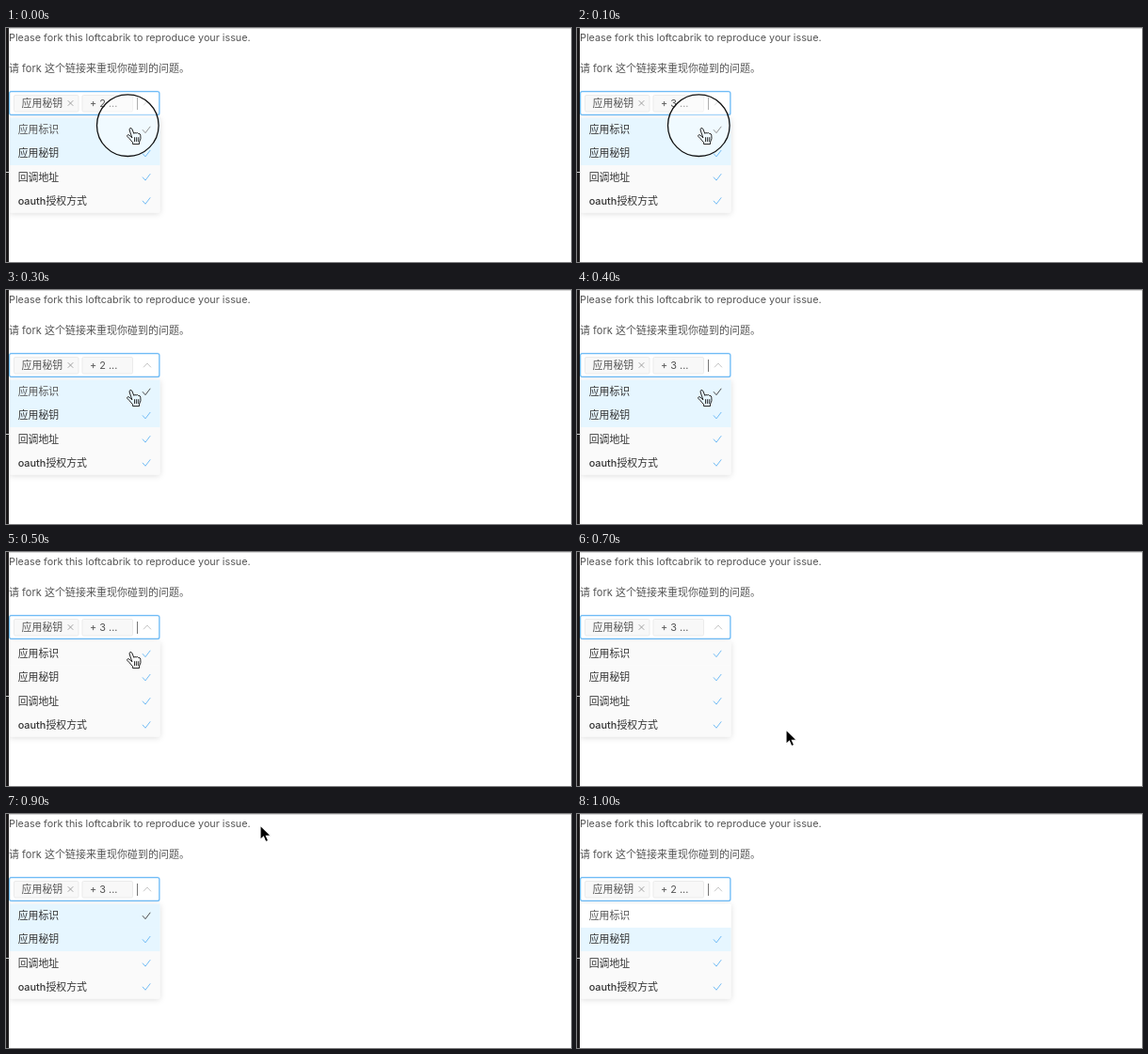
An HTML page that plays this animation: 600x249 px, repeating every 1.1 s.

```html
<!DOCTYPE html>
<html lang="zh-CN">
<head>
<meta charset="utf-8">
<title>Multiple select</title>
<style>
  html, body { margin: 0; width: 100%; height: 100%; overflow: hidden; background: #fff; }
  svg { display: block; width: 600px; height: 249px; }
  text { font: 400 10.9px Inter, "Noto Sans CJK SC", "Noto Sans CJK", sans-serif; fill: #555; }
  .intro { font-size: 10.8px; }
  .bold { font-weight: 500; fill: #333; }
  .line { fill: none; stroke-linecap: round; stroke-linejoin: round; }
  .tag rect { fill: #f8f8f8; stroke: #ebebeb; }
  .menu { filter: drop-shadow(0 1px 3px rgba(0, 0, 0, .14)); }
</style>
</head>
<body>
<svg viewBox="0 0 600 249">
  <rect width="600" height="249" fill="#fff"/>
  <path d="M3 .5H600" stroke="#d8d8d8"/>

  <text class="intro" x="3" y="14">Please fork this loftcabrik to reproduce your issue.</text>
  <text x="3" y="47.3" style="font-size: 11px">请 fork 这个链接来重现你碰到的问题。</text>

  <rect x="2.4" y="66.4" width="161.6" height="27.2" rx="3.5" fill="#dff0ff"/>
  <rect x="3.6" y="67.6" width="159.2" height="24.8" rx="2" fill="#fff" stroke="#6fbcf6" stroke-width="1.2"/>
  <g class="tag">
    <rect x="8.5" y="71.5" width="68.5" height="17.5" rx="1.5"/>
    <text x="16.6" y="84">应用秘钥</text>
    <path class="line" d="M66 77.5l5 5m0-5l-5 5" stroke="#999" stroke-width=".9"/>
    <rect x="81" y="71.5" width="53.5" height="17.5" rx="1.5"/>
    <text id="count" x="89" y="84"></text>
  </g>
  <path class="line" d="M146.3 82l3.7-4 3.7 4" stroke="#c0c0c0" stroke-width=".9"/>
  <path id="caret" d="M139.5 74V87" stroke="#777"/>

  <rect class="menu" x="3.5" y="95.5" width="160" height="101" rx="2" fill="#fff"/>
  <g id="rows"></g>

  <rect width="3" height="249" fill="#1c1a1b"/>
  <path d="M0 153.5H3.5" stroke="#cfcfcf"/>

  <circle id="ring" cx="129.3" cy="103.7" r="32.8" fill="#fff" fill-opacity=".4" stroke="#111" stroke-width="1.3"/>
  <path id="hand" class="line" fill="#fff" stroke="#222" stroke-width="1"/>
  <path id="arrow" d="M0 0V15.4L3.5 12.2 5.8 17.6 8.6 16.4 6.3 11.2H11.2Z" fill="#000" stroke="#fff" stroke-width="1.1"/>
</svg>
<script>
  const $ = id => document.getElementById(id);
  const NS = "http://www.w3.org/2000/svg";
  const BLUE = "#e6f6ff", GREY = "#fafafa", WHITE = "#fff";
  const LINK = "#6cb9f5", DARK = "#444";
  const STEP = 100;

  // Looks of the menu: [count, first row, second row, bold, tick]
  const looks = {
    off:  [2, BLUE, BLUE, false, DARK],
    on:   [3, BLUE, BLUE, true, DARK],
    rest: [3, GREY, GREY, true, LINK],
    done: [2, WHITE, BLUE, false, "none"]
  };

  // [look, caret, ring, pointer: "hand", position or null]
  const steps = [
    ["off", 1, 1, "hand"],
    ["on", 1, 1, "hand"],
    ["rest", 0, 1, "hand"],
    ["off", 0, 0, "hand"],
    ["on", 1, 0, "hand"],
    ["rest", 1, 0, "hand"],
    ["off", 1, 0, "hand"],
    ["rest", 0, 0, [222, 189]],
    ["off", 0, 0, [246, 178]],
    ["on", 1, 0, [270, 12]],
    ["done", 1, 0, null]
  ];

  function add(parent, name, attrs, text = "") {
    const el = document.createElementNS(NS, name);
    for (const key in attrs) el.setAttribute(key, attrs[key]);
    el.textContent = text;
    parent.append(el);
    return el;
  }

  const rows = ["应用标识", "应用秘钥", "回调地址", "oauth授权方式"].map((label, i) => {
    const y = 95.7 + i * 25.2, mid = y + 12.6;
    return {
      back: add($("rows"), "rect", { x: 3.5, y, width: 160, height: 25.3, fill: GREY }),
      label: add($("rows"), "text", { x: 12.7, y: mid + 3.9, class: "bold" }, label),
      tick: add($("rows"), "path", {
        class: "line", d: `M145.2 ${mid + .2}l2.8 3.2 5-6.6`, stroke: LINK, "stroke-width": .95
      })
    };
  });

  $("hand").setAttribute("d",
    "M133.8 116.5L131.2 109Q130.6 107 132 106.5 133.4 106.2 134.1 108L135.8 112.4" +
    "Q136.6 110.9 138.2 111.9 139.6 110.9 140.6 112.4 142.5 111.9 142.8 114.2" +
    "L143 117.4Q142.7 119.8 141.5 121.2V123.6H134.6V121.6Q132.8 120 131.2 117.8" +
    "L128.9 115.5Q128.2 114.1 129.5 113.7 130.8 113.5 132 115Z" +
    "M136.6 116.6V120.6M138.7 116.6V120.6M140.8 116.6V120.6");

  const show = (id, on) => $(id).setAttribute("visibility", on ? "visible" : "hidden");

  function draw(index) {
    const [look, caret, ring, pointer] = steps[index];
    const [count, first, second, bold, tick] = looks[look];
    const isArrow = Array.isArray(pointer);
    $("count").textContent = `+ ${count} ...`;
    rows[0].back.setAttribute("fill", first);
    rows[1].back.setAttribute("fill", second);
    rows[0].label.setAttribute("class", bold ? "bold" : "");
    rows[0].tick.setAttribute("stroke", tick);
    show("caret", caret);
    show("ring", ring);
    show("hand", pointer === "hand");
    show("arrow", isArrow);
    if (isArrow) $("arrow").setAttribute("transform", `translate(${pointer})`);
  }

  const start = performance.now();
  let last = -1;
  function tickFrame() {
    const elapsed = Math.max(0, performance.now() - start);
    const index = Math.floor(elapsed / STEP) % steps.length;
    if (index !== last) draw(last = index);
    requestAnimationFrame(tickFrame);
  }
  tickFrame();
</script>
</body>
</html>
```
